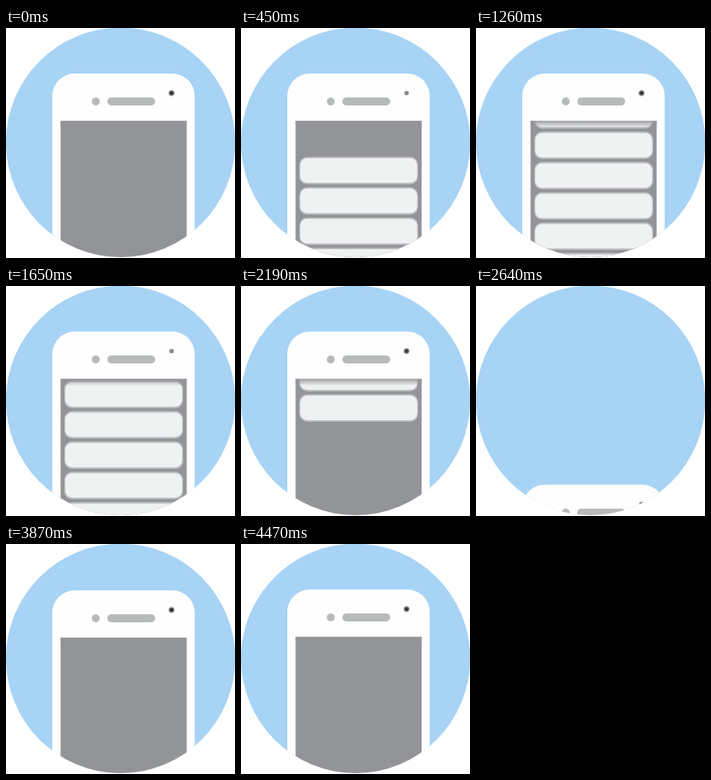
Recreate the animation shown at these times as an HTML page. Size 287x288 px, loop 4500 ms.

```html
<!DOCTYPE html>
<html lang="en">
<head>
<meta charset="utf-8">
<title>Phone notifications</title>
<style>
  html, body { margin: 0; width: 100%; height: 100%; overflow: hidden; background: #fff; }
  svg { display: block; width: 100%; height: 100%; }
</style>
</head>
<body>
<svg viewBox="0 0 287 288" preserveAspectRatio="xMidYMid meet">
  <defs>
    <clipPath id="disc"><circle cx="143.6" cy="143.3" r="143.7"/></clipPath>
    <clipPath id="screen"><rect x="68.4" y="116.4" width="158" height="180"/></clipPath>
    <radialGradient id="glow">
      <stop offset=".3" stop-color="#303034"/>
      <stop offset=".55" stop-color="#77777a"/>
      <stop offset="1" stop-color="#eee" stop-opacity="0"/>
    </radialGradient>
    <linearGradient id="shade" x2="0" y2="1">
      <stop offset="0" stop-color="#939498" stop-opacity=".9"/>
      <stop offset=".5" stop-color="#939498" stop-opacity=".45"/>
      <stop offset="1" stop-color="#939498" stop-opacity="0"/>
    </linearGradient>
    <g id="row">
      <rect x="73" y="-.5" width="149" height="34.5" rx="10" fill="#bcbec3"/>
      <rect x="74.3" y="1.3" width="146.4" height="30.7" rx="8.5" fill="#f0f2f2"/>
    </g>
  </defs>
  <g clip-path="url(#disc)">
    <rect width="288" height="288" fill="#a7d3f5"/>
    <g id="phone">
      <rect x="58" y="57" width="178.5" height="300" rx="28" fill="#fefefe"/>
      <circle cx="112.5" cy="92" r="5" fill="#b7babb"/>
      <rect x="127" y="87" width="60" height="10" rx="5" fill="#b7babb"/>
      <circle cx="207.5" cy="81.5" r="2.8" fill="#88888b"/>
      <circle id="led" cx="207.5" cy="81.5" r="5" fill="url(#glow)"/>
      <rect x="68.4" y="116.4" width="158" height="240" fill="#939498"/>
      <g clip-path="url(#screen)"><g id="list"></g></g>
      <rect x="68.4" y="116.4" width="158" height="8.6" fill="url(#shade)"/>
    </g>
  </g>
</svg>
<script>
const LOOP = 4500, ROWS = 15, PITCH = 38;
const SPEED = 0.3206, FIRST_ROW_Y = 306.4;
const EXIT = [2350, 2670], ENTER = [3420, 3960], TRAVEL = 232;

const byId = id => document.getElementById(id);
const phone = byId('phone'), list = byId('list'), led = byId('led');
const clamp = v => Math.min(1, Math.max(0, v));
const progress = (t, [start, end]) => clamp((t - start) / (end - start));
const moveY = (node, y) => node.setAttribute('transform', `translate(0 ${y})`);

list.innerHTML = Array.from({ length: ROWS },
  (_, i) => `<use href="#row" y="${i * PITCH}"/>`).join('');

function draw(t) {
  // Rows scroll steadily; the phone drops out and later rises back empty.
  moveY(list, FIRST_ROW_Y - SPEED * t);
  const away = t < ENTER[0]
    ? progress(t, EXIT) ** 2
    : (1 - progress(t, ENTER)) ** 3;
  moveY(phone, TRAVEL * away);
  led.setAttribute('opacity', clamp(0.6 + 3 * Math.cos(2 * Math.PI * (t / 900 - 0.2))));
}

const start = performance.now();
function tick() {
  draw((performance.now() - start) % LOOP);
  requestAnimationFrame(tick);
}
tick();
</script>
</body>
</html>
```
